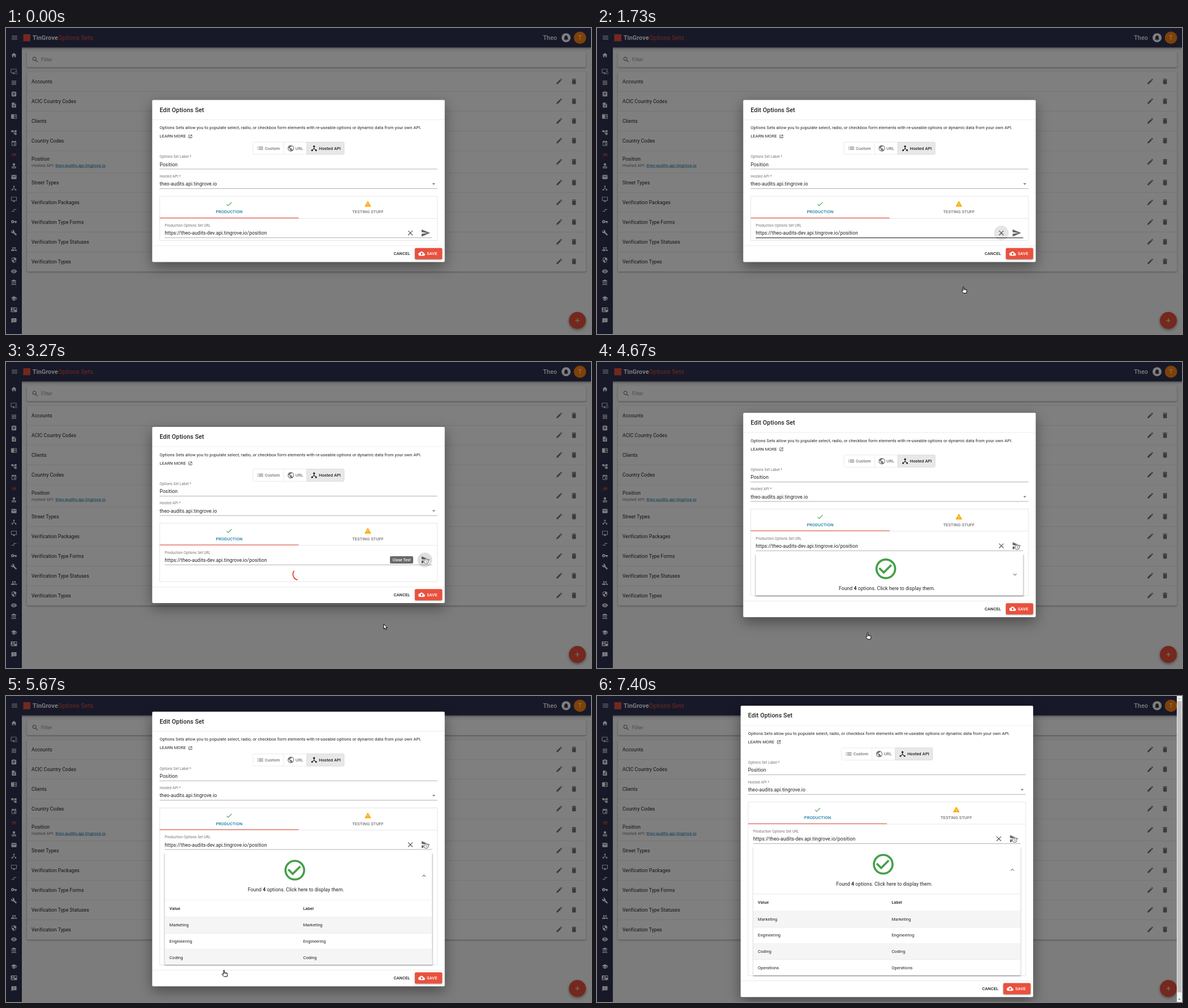
An HTML page with a canvas that plays this animation: 1033 px wide and 542 px high, repeating every 8 s.

```html
<!DOCTYPE html>
<html lang="en">
<head>
<meta charset="utf-8">
<title>Options Sets</title>
<style>
html, body { margin: 0; width: 100%; height: 100%; overflow: hidden; background: #7d7d7d; }
canvas { display: block; width: 1033px; height: 542px; }
</style>
</head>
<body>
<canvas id="stage" width="1033" height="542"></canvas>
<script>
const W = 1033, H = 542, LOOP = 8000;
const U = W / 1920; // layout unit: one CSS pixel of the 1920 wide app
const ctx = document.getElementById('stage').getContext('2d');
const RED = '#e9513d', INK = 'rgba(0,0,0,.87)', SOFT = 'rgba(0,0,0,.54)', LINE = '#e0e0e0', GREEN = '#43a047';
const HOST = 'theo-audits.api.tingrove.io';

const ICONS = {
  menu: 'M3 18h18v-2H3zm0-5h18v-2H3zm0-7v2h18V6z',
  home: 'M10 20v-6h4v6h5v-8h3L12 3 2 12h3v8z',
  devices: 'M23 11h-5c-.6 0-1 .4-1 1v9c0 .6.4 1 1 1h5c.6 0 1-.4 1-1v-9c0-.6-.4-1-1-1zm0 9h-5v-7h5zM20 2H2C.9 2 0 2.9 0 4v12c0 1.1.9 2 2 2h7v2H7v2h8v-2h-2v-2h2v-2H2V4h18v5h2V4c0-1.1-.9-2-2-2z',
  apps: 'M4 4h4v4H4zm6 0h4v4h-4zm6 0h4v4h-4zM4 10h4v4H4zm6 0h4v4h-4zm6 0h4v4h-4zM4 16h4v4H4zm6 0h4v4h-4zm6 0h4v4h-4z',
  clipboard: 'M19 3h-4.2a3 3 0 0 0-5.6 0H5c-1.1 0-2 .9-2 2v14c0 1.1.9 2 2 2h14c1.1 0 2-.9 2-2V5c0-1.1-.9-2-2-2zm-7 0a1 1 0 1 1 0 2 1 1 0 0 1 0-2zm2 14H7v-2h7zm3-4H7v-2h10zm0-4H7V7h10z',
  note: 'M14 2H6c-1.1 0-2 .9-2 2v16c0 1.1.9 2 2 2h12c1.1 0 2-.9 2-2V8zm2 14h-3v3h-2v-3H8v-2h3v-3h2v3h3zm-3-7V3.5L18.5 9z',
  reader: 'M13 12h7v1.5h-7zm0-2.5h7V11h-7zm0 5h7V16h-7zM21 4H3c-1.1 0-2 .9-2 2v13c0 1.1.9 2 2 2h18c1.1 0 2-.9 2-2V6c0-1.1-.9-2-2-2zm0 15h-9V6h9z',
  tree: 'M22 11V3h-7v3H9V3H2v8h7V8h2v10h4v3h7v-8h-7v3h-2V8h2v3z',
  event: 'M17 12h-5v5h5zM16 1v2H8V1H6v2H5c-1.1 0-2 .9-2 2v14c0 1.1.9 2 2 2h14c1.1 0 2-.9 2-2V5c0-1.1-.9-2-2-2h-1V1zm3 18H5V8h14z',
  list: 'M3 11h2v2H3zm0 4h2v2H3zm0-8h2v2H3zm4 4h14v2H7zm0 4h14v2H7zm0-8h14v2H7z',
  stamp: 'M4 16v6h16v-6c0-1.1-.9-2-2-2H6c-1.1 0-2 .9-2 2zm14 3H6v-2h12zM12 2C9.500 2 7 4 7 7l5 7 5-7c0-3-2.500-5-5-5z',
  mail: 'M20 4H4c-1.1 0-2 .9-2 2v12c0 1.1.9 2 2 2h16c1.1 0 2-.9 2-2V6c0-1.1-.9-2-2-2zm0 4l-8 5-8-5V6l8 5 8-5z',
  hub: 'M17 16l-4-4V8.8A3 3 0 1 0 11 8.800V12l-4 4H3v5h5v-3l4-4.200 4 4.200V21h5v-5z',
  desktop: 'M21 2H3c-1.1 0-2 .9-2 2v12c0 1.1.9 2 2 2h7v2H8v2h8v-2h-2v-2h7c1.1 0 2-.9 2-2V4c0-1.1-.9-2-2-2zm0 14H3V4h18z',
  arrows: 'M9 14H2v2h7v3l4-4-4-4zm6-1v-3h7V8h-7V5l-4 4z',
  key: 'M12.650 10a6 6 0 1 0 0 4H17v4h4v-4h2v-4zM7 14a2 2 0 1 1 0-4 2 2 0 0 1 0 4z',
  wrench: 'M22.700 19l-9.100-9.100c.9-2.300.4-5-1.500-6.900-2-2-5-2.400-7.400-1.300L9 6 6 9 1.600 4.700C.4 7.100.9 10.100 2.900 12.100c1.900 1.900 4.600 2.400 6.900 1.500l9.100 9.100c.4.4 1 .4 1.400 0l2.300-2.300c.5-.4.5-1.100.1-1.400z',
  people: 'M16 11a3 3 0 1 0 0-6 3 3 0 0 0 0 6zm-8 0a3 3 0 1 0 0-6 3 3 0 0 0 0 6zm0 2c-2.300 0-7 1.200-7 3.500V19h14v-2.500C15 14.200 10.300 13 8 13zm8 0l-1 .05c1.200.85 2 2 2 3.450V19h6v-2.500c0-2.300-4.700-3.500-7-3.500z',
  shield: 'M12 1L3 5v6c0 5.550 3.840 10.740 9 12 5.160-1.260 9-6.450 9-12V5zm0 11h7c-.5 4.100-3.300 7.800-7 8.900V12H5V6.300l7-3.100z',
  eye: 'M12 4.500C7 4.500 2.700 7.600 1 12c1.700 4.400 6 7.500 11 7.500s9.300-3.100 11-7.500c-1.700-4.400-6-7.500-11-7.500zM12 17a5 5 0 1 1 0-10 5 5 0 0 1 0 10zm0-8a3 3 0 1 0 0 6 3 3 0 0 0 0-6z',
  bank: 'M4 10v7h3v-7zm6 0v7h3v-7zM2 22h19v-3H2zm14-12v7h3v-7zm-4.500-9L2 6v2h19V6z',
  school: 'M5 13.200v4L12 21l7-3.800v-4L12 17zM12 3L1 9l11 6 9-4.900V17h2V9z',
  card: 'M2 3h20c1.1 0 2 .9 2 2v14c0 1.1-.9 2-2 2H2c-1.1 0-2-.9-2-2V5c0-1.1.9-2 2-2zm6 3a3 3 0 1 0 0 6 3 3 0 0 0 0-6zM2 18h12v-1c0-2-4-3-6-3s-6 1-6 3zM14 6v6h8V6z',
  feedback: 'M20 2H4c-1.1 0-2 .9-2 2v18l4-4h14c1.1 0 2-.9 2-2V4c0-1.1-.9-2-2-2zm-7 12h-2v-2h2zm0-4h-2V6h2z',
  edit: 'M3 17.250V21h3.750L17.800 9.940l-3.750-3.750zM20.700 7.040c.4-.4.4-1 0-1.410l-2.340-2.340c-.4-.4-1-.4-1.410 0l-1.830 1.830 3.750 3.750z',
  trash: 'M6 19c0 1.1.9 2 2 2h8c1.1 0 2-.9 2-2V7H6zM19 4h-3.500l-1-1h-5l-1 1H5v2h14z',
  search: 'M15.500 14h-.8l-.3-.3a6.500 6.500 0 1 0-.7.7l.3.3v.8l5 5 1.500-1.500zm-6 0a4.500 4.500 0 1 1 0-9 4.500 4.500 0 0 1 0 9z',
  bell: 'M12 22c1.1 0 2-.9 2-2h-4c0 1.1.9 2 2 2zm6-6v-5c0-3.100-1.600-5.600-4.500-6.300V4a1.500 1.500 0 0 0-3 0v.7C7.600 5.400 6 7.900 6 11v5l-2 2v1h16v-1z',
  open: 'M19 19H5V5h7V3H5c-1.1 0-2 .9-2 2v14c0 1.1.9 2 2 2h14c1.1 0 2-.9 2-2v-7h-2zM14 3v2h3.600l-9.800 9.800 1.400 1.400L19 6.400V10h2V3z',
  globe: 'M12 2a10 10 0 1 0 0 20 10 10 0 0 0 0-20zm-1 17.900A8 8 0 0 1 4.200 10.200L9 15v1c0 1.1.9 2 2 2zm6.900-2.500A2 2 0 0 0 16 16h-1v-3c0-.5-.5-1-1-1H8v-2h2c.5 0 1-.5 1-1V7h2c1.1 0 2-.9 2-2v-.4a8 8 0 0 1 2.900 12.800z',
  check: 'M9 16.200L4.800 12l-1.400 1.400L9 19 21 7l-1.400-1.400z',
  warning: 'M1 21h22L12 2zm12-3h-2v-2h2zm0-4h-2v-4h2z',
  close: 'M19 6.400L17.600 5 12 10.600 6.400 5 5 6.400l5.600 5.600L5 17.600 6.400 19l5.600-5.600 5.600 5.600 1.400-1.400-5.600-5.600z',
  send: 'M2 21L23 12 2 3v7l15 2-15 2z',
  upload: 'M19.350 10A7.500 7.500 0 0 0 5.350 8 6 6 0 0 0 6 20h13a5 5 0 0 0 .35-10zM14 13v4h-4v-4H7l5-5 5 5z',
  chevron: 'M16.600 8.600L12 13.200 7.400 8.600 6 10l6 6 6-6z',
  done: 'M16.600 7.600L10 14.200l-3.600-3.600L5 12l5 5 8-8zM12 2a10 10 0 1 0 0 20 10 10 0 0 0 0-20zm0 18a8 8 0 1 1 0-16 8 8 0 0 1 0 16z',
  drop: 'M7 10l5 5 5-5z',
  add: 'M19 13h-6v6h-2v-6H5v-2h6V5h2v6h6z'
};
for (const name in ICONS) ICONS[name] = new Path2D(ICONS[name]);

const ARROW = new Path2D('M0 0V9L2 7.200 3.400 10.300 4.900 9.600 3.600 6.600H6.300Z');
const HAND = new Path2D('M-1 .8C-1-.2.8-.2.8.8V4.400L5 5.200Q6.300 5.600 6.100 7L5.400 11.500H.2L-3.200 7.800C-3.800 6.800-2.600 6.200-1.900 6.800L-1 7.600Z');

const clamp = v => Math.min(1, Math.max(0, v));

function bezier(x1, y1, x2, y2) {
  const at = (a, b, s) => 3 * (1 - s) * (1 - s) * s * a + 3 * (1 - s) * s * s * b + s * s * s;
  return x => {
    let lo = 0, hi = 1;
    for (let i = 0; i < 22; i++) {
      const mid = (lo + hi) / 2;
      if (at(x1, x2, mid) < x) lo = mid; else hi = mid;
    }
    return at(y1, y2, lo);
  };
}
const standard = bezier(.4, 0, .2, 1), inOut = bezier(.42, 0, .58, 1);

function rect(x, y, w, h, color) {
  ctx.fillStyle = color;
  ctx.fillRect(x, y, w, h);
}

function box(x, y, w, h, r, fill, stroke) {
  ctx.beginPath();
  ctx.roundRect(x, y, w, h, r);
  if (fill) { ctx.fillStyle = fill; ctx.fill(); }
  if (stroke) { ctx.strokeStyle = stroke; ctx.lineWidth = .6; ctx.stroke(); }
}

function disc(x, y, r, color) {
  ctx.beginPath();
  ctx.arc(x, y, r, 0, 7);
  ctx.fillStyle = color;
  ctx.fill();
}

function shadowed(blur, dy, alpha, draw) {
  ctx.save();
  ctx.shadowColor = `rgba(0,0,0,${alpha})`;
  ctx.shadowBlur = blur;
  ctx.shadowOffsetY = dy;
  draw();
  ctx.restore();
}

function icon(name, x, y, size, color, turn = 0) {
  ctx.save();
  ctx.translate(x, y);
  ctx.rotate(turn);
  ctx.scale(size / 24, size / 24);
  ctx.translate(-12, -12);
  ctx.fillStyle = color;
  ctx.fill(ICONS[name], 'evenodd');
  ctx.restore();
}

// y is the middle of the capitals, size is in layout units; returns the width
function text(s, x, y, size, color = INK, weight = 400, align = 'left') {
  const px = size * U;
  ctx.font = `${weight} ${px}px Roboto, sans-serif`;
  ctx.letterSpacing = px * .009 + 'px';
  ctx.textAlign = align;
  ctx.fillStyle = color;
  ctx.fillText(s, x, y + px * .355);
  return ctx.measureText(s).width;
}

const SIDE = [['home', 48], ['devices', 77], ['apps', 97], ['clipboard', 117], ['note', 136.5], ['reader', 156.5],
  ['tree', 185], ['event', 204.5], ['list', 224.5], ['stamp', 244], ['mail', 264], ['hub', 283.5], ['desktop', 303.5],
  ['arrows', 323], ['key', 343], ['wrench', 362.5], ['people', 391.5], ['shield', 411], ['eye', 431], ['bank', 450.5],
  ['school', 479], ['card', 499], ['feedback', 518.5]];
const ROWS = ['Accounts', 'ACIC Country Codes', 'Clients', 'Country Codes', 'Position', 'Street Types',
  'Verification Packages', 'Verification Type Forms', 'Verification Type Statuses', 'Verification Types'];

function drawPage() {
  rect(0, 0, W, H, '#fafafa');
  for (const [y, h] of [[42, 27.5], [77.5, 354]])
    shadowed(2.5, 1, .4, () => box(36.8, y, 987.5, h, 2, '#fff'));
  icon('search', 51.5, 56, 13, SOFT);
  text('Filter', 62, 56, 16, 'rgba(0,0,0,.42)');
  ROWS.forEach((name, i) => {
    const open = name === 'Position';
    const y = 94.6 + i * 34.95 + (i > 4 ? 4.3 : open ? 2.5 : 0);
    text(name, 45, open ? 231.5 : y, 16);
    if (open) {
      const w = text('Hosted API: ', 45, 243, 14, SOFT);
      const link = text(HOST, 45 + w, 243, 14, '#1c7ea6');
      rect(45 + w, 246.6, link, .6, '#1c7ea6');
    }
    icon('edit', 977, y, 13, SOFT);
    icon('trash', 1003, y, 13, SOFT);
    if (i < 9) rect(36.8, y + (open ? 19.4 : 17.4), 987.5, .6, LINE);
  });
  shadowed(5, 2, .4, () => disc(1009, 518, 15, RED));
  icon('add', 1009, 518, 13, '#fff');

  shadowed(4, 1.5, .4, () => rect(0, 0, W, 34.4, '#2f3250'));
  rect(0, 34, 28, H, '#2f3250');
  icon('menu', 15, 17, 13, '#fff');
  rect(30.500, 11, 12.500, 12.500, RED);
  text('TinGrove', 47, 17.3, 20, '#fff', 700);
  text('Options Sets', 92, 17.3, 20, RED);
  text('Theo', 973, 17.3, 20, '#fff', 500, 'right');
  disc(989, 17.2, 8, '#fff');
  icon('bell', 989, 17.2, 11.500, '#2f3250');
  disc(1013.5, 17.2, 10.8, '#ff8410');
  text('T', 1013.5, 17.3, 20, '#fff', 400, 'center');
  for (const [name, y] of SIDE) icon(name, 14, y, 11, name === 'list' ? RED : '#fff');
  rect(0, 0, W, H, 'rgba(0,0,0,.5)');
}

function field(label, value, x, right, y, hover) {
  text(label, x, y, 12, SOFT);
  text(value, x, y + 13.4, 16);
  rect(x, y + (hover ? 21.2 : 21.5), right - x, hover ? 1.1 : .6, hover ? INK : 'rgba(0,0,0,.5)');
}

function sendIcon(testing) {
  icon('send', 741, 235.6, 17, 'rgba(0,0,0,.6)');
  if (!testing) return;
  disc(742, 238.400, 4.900, '#fff');
  ctx.strokeStyle = 'rgba(0,0,0,.6)';
  ctx.lineWidth = 1;
  ctx.beginPath();
  ctx.arc(742, 238.400, 3.800, 0, 7);
  ctx.moveTo(742, 236.400);
  ctx.lineTo(742, 238.600);
  ctx.lineTo(743.500, 239.500);
  ctx.stroke();
}

function tooltip(label, alpha) {
  const w = label === 'Test' ? 22.5 : 41;
  ctx.save();
  ctx.globalAlpha = alpha;
  ctx.translate(719, 235.6);
  ctx.scale(.75 + alpha / 4, .75 + alpha / 4);
  box(-w, -6.5, w, 13, 2, 'rgba(97,97,97,.95)');
  text(label, -w / 2, 0, 12.3, '#fff', 500, 'center');
  ctx.restore();
}

function spinner(ms) {
  const f = ms / 1400 % 1, unit = 1 / 20.2;
  const a = inOut(clamp(f * 2)), b = inOut(clamp(f * 2 - 1));
  const from = 15 * a + 110 * b, to = Math.min(from + 1 + 99 * a, 126.9);
  ctx.strokeStyle = RED;
  ctx.lineWidth = 3.6 * U;
  ctx.beginPath();
  ctx.arc(516.5, 261, 20.2 * U * 40 / 44, f * 2 * Math.PI + from * unit, f * 2 * Math.PI + to * unit);
  ctx.stroke();
}

function accordion(bottom, q) {
  const pad = 4.5 * q, head = 324 + 9.3 * q;
  shadowed(2, 1, .45, () => rect(280.3, 250, 472.2, bottom - 250, '#fff'));
  rect(278, 246, 477, 5, '#fff');
  icon('done', 510, 276.3 + pad, 44, GREEN);
  const parts = [['Found ', 400], ['4', 700], [' options. Click here to display them.', 400]];
  let x = 427;
  for (const [s, weight] of parts) x += text(s, x, 311.2 + pad, 16, INK, weight);
  icon('chevron', 738, 286.3 + pad, 13, SOFT, Math.PI * q);
  if (bottom < head + .5) return;
  ctx.save();
  ctx.beginPath();
  ctx.rect(280.3, head - .5, 472.2, bottom - head + .5);
  ctx.clip();
  rect(280.3, head - .4, 472.2, .7, LINE);
  ['Value', 'Marketing', 'Engineering', 'Coding', 'Operations'].forEach((name, i) => {
    const y = head + (i ? 30.500 + (i - 1) * 28.6 : 0), mid = y + (i ? 14.2 : 15);
    if (i % 2) rect(280.3, y, 472.2, 28.6, '#f5f5f5');
    rect(280.3, y + (i ? 28.3 : 30.2), 472.2, .6, LINE);
    text(name, 288.600, mid, 14, INK, i ? 400 : 500);
    text(i ? name : 'Label', 524.700, mid, 14, INK, i ? 400 : 500);
  });
  ctx.restore();
}

function drawDialog(t) {
  const loading = t >= 2950 && t < 3600, found = t >= 3600;
  const q = standard(clamp((t - 5490) / 150)), p = standard(clamp((t - 5490) / 350));
  const extra = found ? 75 + 9.3 * q + 144.7 * p : loading ? 25 : 0;
  const h = 287 + extra, scrolls = h > H - 64 * U;
  const top = Math.max(32 * U, (H - h) / 2), end = 249 + extra;

  ctx.save();
  ctx.translate(scrolls ? -4.55 : 0, top);
  shadowed(24, 8, .4, () => box(258.2, 0, 516.5, h, 2, '#fff'));
  text('Edit Options Set', 271.2, 17.4, 20, INK, 500);
  rect(258.2, 34.6, 516.5, .6, LINE);
  text('Options Sets allow you to populate select, radio, or checkbox form elements with re-useable options or dynamic data from your own API.', 271.2, 49, 14);
  text('LEARN MORE', 271.2, 64, 14);
  icon('open', 325.500, 64.4, 8, INK);

  box(436, 74.7, 161, 21.6, 2, '#fff', '#dcdcdc');
  box(531, 74.7, 66, 21.6, [0, 2, 2, 0], '#e8e8e8', '#d2d2d2');
  rect(490, 74.7, .6, 21.6, '#dcdcdc');
  icon('list', 449, 85.5, 13.500, SOFT);
  text('Custom', 457, 85.4, 14, SOFT, 500);
  icon('globe', 503, 85.5, 13.500, SOFT);
  text('URL', 511, 85.4, 14, SOFT, 500);
  icon('hub', 544, 85.5, 13, INK);
  text('Hosted API', 552.500, 85.4, 14, INK, 500);

  field('Options Set Label *', 'Position', 271.2, 761.7, 100.6);
  field('Hosted API *', HOST, 271.2, 761.7, 135.2, t > 640 && t < 830);
  icon('drop', 755.300, 148.6, 13, SOFT);

  box(271.5, 170.500, 490.2, end - 170.500, 0, null, '#d6d6d6');
  rect(271.5, 209.5, 490.2, .6, '#d6d6d6');
  rect(271.5, 208.4, 245.1, 1.1, RED);
  icon('check', 394, 184.2, 13, GREEN);
  text('PRODUCTION', 394, 198.3, 14, '#1c7ea6', 500, 'center');
  icon('warning', 639, 184, 13, '#ffab0f');
  text('TESTING STUFF', 639, 198.3, 14, SOFT, 500, 'center');

  field('Production Options Set URL', 'https://theo-audits-dev.api.tingrove.io/position', 280.3, 752.6, 222.4, t >= 1250 && t < 2950);
  const overClose = clamp((t - 1540) / 120) * clamp((1930 - t) / 100);
  if (overClose) disc(714, 235.6, 13, `rgba(0,0,0,${.1 * overClose})`);
  const overSend = found ? 0 : clamp((t - 1850) / 120) * (t < 2730 ? .08 : .13);
  if (overSend) disc(739.700, 235.6, 13, `rgba(0,0,0,${overSend})`);
  icon('close', 714, 235.6, 15, 'rgba(0,0,0,.65)');
  sendIcon(t >= 2950);
  if (loading) spinner(t - 2955 + 1400);
  if (found) accordion(end - .5, q);
  if (loading) tooltip('Close Test', 1);
  else if (t > 1980 && !found) tooltip('Test', clamp((t - 1980) / 200));

  rect(258.2, 258 + extra, 516.5, .6, LINE);
  text('CANCEL', 699, 272 + extra, 14, INK, 500, 'center');
  shadowed(2.500, 1, .4, () => box(722, 262.3 + extra, 48.2, 19.8, 2, RED));
  icon('upload', 734, 272.2 + extra, 11.500, '#fff');
  text('SAVE', 752.300, 272 + extra, 14, '#fff', 500, 'center');
  ctx.restore();
  if (scrolls) drawScrollbar(h + 64 * U);
}

function drawScrollbar(full) {
  const w = 17 * U, x = W - w;
  rect(x, 0, w, H, '#f1f1f1');
  rect(x + 1, w, w - 2, (H - 2 * w) * H / full, '#c1c1c1');
  for (const [y, d, color] of [[5.5, -2, '#a3a3a3'], [H - 5.5, 2, '#505050']]) {
    ctx.fillStyle = color;
    ctx.beginPath();
    ctx.moveTo(x + w / 2 - 2, y);
    ctx.lineTo(x + w / 2 + 2, y);
    ctx.lineTo(x + w / 2, y + d);
    ctx.fill();
  }
}

// time, x, y of the pointer tip
const PATH = [[270, 165, 242], [640, 350, 320], [1070, 548, 402], [1400, 618, 440], [1730, 647, 458], [1930, 658, 463],
  [2200, 667, 464], [4140, 667, 464], [4400, 574, 473], [4670, 478, 479.500], [5000, 392, 485], [5130, 385, 485.500],
  [5800, 385, 485.500], [6140, 385, 485], [6500, 480, 455], [6780, 570, 445], [7000, 601.500, 457], [7340, 995, 476]];

function drawPointer(t) {
  const i = PATH.findIndex(k => k[0] > t);
  if (i < 1) return;
  const [t0, x0, y0] = PATH[i - 1], [t1, x1, y1] = PATH[i];
  const f = (t - t0) / (t1 - t0);
  const hand = t > 1540 && t < 2950 || t > 4330 && t < 5840;
  const shape = hand ? HAND : ARROW;
  ctx.save();
  ctx.translate(x0 + (x1 - x0) * f, y0 + (y1 - y0) * f);
  ctx.lineJoin = 'round';
  ctx.lineWidth = 1;
  ctx.strokeStyle = '#000';
  ctx.fillStyle = '#fff';
  ctx.fill(shape);
  ctx.stroke(shape);
  if (hand) {
    ctx.lineWidth = .6;
    ctx.stroke(new Path2D('M.8 4.400V6.500M2.600 4.800V6.700M4.300 5.100V6.900'));
  }
  ctx.restore();
}

function frame() {
  const t = performance.now() % LOOP;
  drawPage();
  drawDialog(t);
  drawPointer(t);
  requestAnimationFrame(frame);
}
frame();
</script>
</body>
</html>
```
